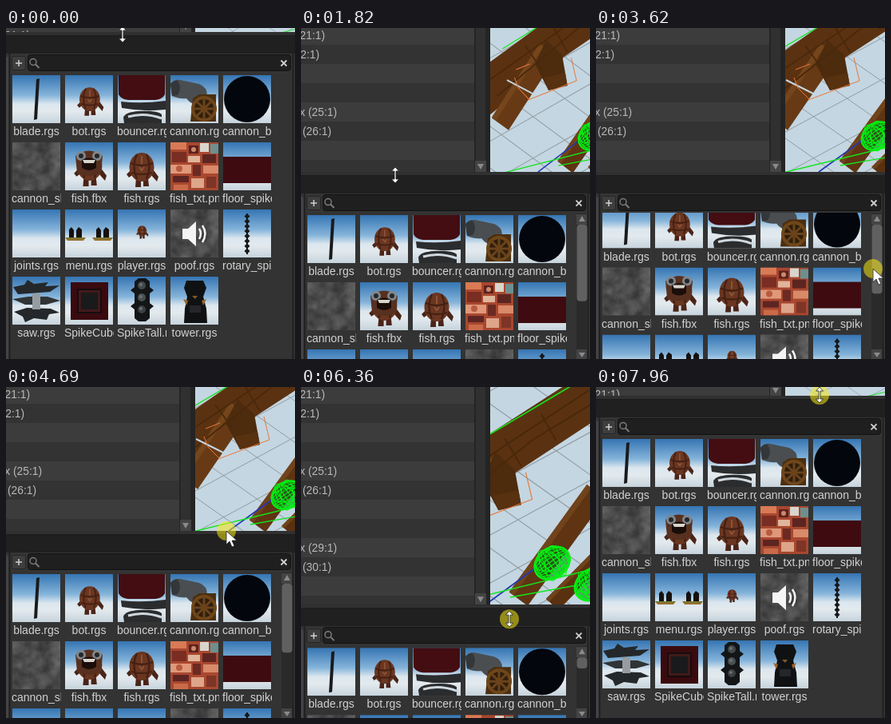
Recreate the animation shown at these times as an HTML page. Size 362x414 px, loop 8000 ms.

```html
<!DOCTYPE html>
<html lang="en">
<head>
<meta charset="utf-8">
<title>Resizing an asset panel</title>
<style>
  html, body { margin: 0; width: 100%; height: 100%; overflow: hidden; background: #333; }
  #stage { display: block; width: 362px; height: 414px; }
  text { font-family: "Liberation Sans", Arial, sans-serif; fill: #d2d2d2; }
  .label { font-size: 14px; }
  .row { font-size: 13.8px; fill: #b9b9b9; text-anchor: end; }
</style>
</head>
<body>
<svg id="stage" viewBox="0 0 362 414" xmlns="http://www.w3.org/2000/svg">
  <defs>
    <linearGradient id="sky" x2="0" y2="1">
      <stop offset="0" stop-color="#3575b3"/>
      <stop offset=".42" stop-color="#85b4da"/>
      <stop offset=".6" stop-color="#dbe6ee"/>
      <stop offset=".75" stop-color="#e3eaee"/>
      <stop offset="1" stop-color="#c6d3dc"/>
    </linearGradient>
    <filter id="smoke" x="0" y="0" width="1" height="1" color-interpolation-filters="sRGB">
      <feTurbulence type="fractalNoise" baseFrequency=".06" numOctaves="3" seed="4"/>
      <feColorMatrix values=".3 0 0 0 .15 .3 0 0 0 .15 .3 0 0 0 .15 0 0 0 0 1"/>
    </filter>
    <g id="critter">
      <path d="M18 31l-7 7 3 4 7-5M42 29l9 12-2 6-8-9M23 42l-1 12h7v-9M32 44v9h7l-1-10" fill="#4a2418"/>
      <ellipse cx="30" cy="29" rx="15.500" ry="18" fill="#6a3621"/>
      <path d="M24 13q-7 14 0 31M36 13q7 14 0 31M16 24q14 6 28 0M17 36q13 4 26 0" fill="none" stroke="#442013" stroke-width="2.200"/>
      <path d="M30 15v10M27 29l3 4 3-4" fill="none" stroke="#8f5838" stroke-width="1.800"/>
    </g>
    <g id="boat">
      <path d="M-13 3h26l-3 4h-20z" fill="#9a6d2e"/>
      <path d="M-12 4h24" stroke="#6c7d35" stroke-width="1.5"/>
      <path d="M-8 3v-10l3-3 3 4v9zM1 3v-9l3-4 4 3v10z" fill="#15110f"/>
    </g>
    <clipPath id="view"><rect x="237" y="0" width="125" height="414"/></clipPath>
  </defs>

  <g id="list"></g>
  <rect x="217" width="20" height="414" fill="#242424"/>
  <rect x="219" width="12" height="414" fill="#303030"/>
  <g id="listEnd">
    <rect x="218" y="-7" width="14" height="14" fill="#444"/>
    <path d="M221-3h8l-4 7z" fill="#8a8a8a"/>
  </g>
  <g clip-path="url(#view)"><g id="scene"></g></g>

  <g id="panel">
    <rect y="-39" width="362" height="500" fill="#1c1c1c"/>
    <rect y="-39" width="362" height="4" fill="#303030"/>
    <rect y="-34" width="362" height="22" fill="#202020"/>
    <rect y="-12" width="362" height="500" fill="#353535"/>
    <rect x="5" y="12" width="354" height="480" fill="#333"/>
    <rect x="-4" y="-8" width="7" height="500" rx="3" fill="#444"/>
    <path d="M4.500-12V480M359.500-12V480" stroke="#202020" stroke-width="2"/>
    <rect x="7.500" y="-8.500" width="17" height="17" rx="2" fill="#3e3e3e" stroke="#242424"/>
    <path d="M12 0h8M16-4v8" stroke="#d0d0d0" stroke-width="1.500"/>
    <rect x="27.500" y="-10.500" width="329" height="20" rx="3" fill="#1f1f1f" stroke="#121212"/>
    <circle cx="34" cy="-1.500" r="4" fill="none" stroke="#7c7c7c" stroke-width="1.500"/>
    <path d="M37 1.500l4.500 4.500" stroke="#7c7c7c" stroke-width="2"/>
    <path d="M344.500-3.500l7 7m0-7l-7 7" stroke="#d0d0d0" stroke-width="1.800"/>
  </g>
  <svg id="content" x="5" width="340" height="500"><g id="cells"></g></svg>
  <g id="bar">
    <rect id="track" x="345" width="13" height="400" fill="#2a2a2a"/>
    <rect id="up" x="345" width="13" height="13" fill="#444"/>
    <path id="upMark" d="M348 3h8l-4-7z" fill="#8a8a8a"/>
    <rect x="345" y="402" width="13" height="12" fill="#444"/>
    <path d="M348 406h8l-4 6z" fill="#8a8a8a"/>
    <rect id="thumb" x="345.500" width="13" rx="4" fill="#606060"/>
  </g>

  <g id="cursor">
    <circle id="press" r="12" fill="#f8e812" opacity=".54"/>
    <path id="resize" d="M0-10l4.500 5H1V5h3.500L0 10l-4.500-5H-1V-5h-3.500z" fill="#fff" stroke="#222" stroke-width=".8"/>
    <path id="arrow" d="M0 0v17l4-4 3 7 3-1.300-3-6.700h6z" fill="#fff" stroke="#222" stroke-width=".8"/>
  </g>
</svg>

<script>
const $ = id => document.getElementById(id);
const set = (id, attrs) => { for (const k in attrs) $(id).setAttribute(k, attrs[k]); };
const show = (id, on) => set(id, { visibility: on ? 'visible' : 'hidden' });
const rect = (x, y, w, h, fill) => `<rect x="${x}" y="${y}" width="${w}" height="${h}" fill="${fill}"/>`;
const path = (d, fill, more = '') => `<path d="${d}" fill="${fill}" ${more}/>`;
const line = (d, stroke, w = 1) => path(d, 'none', `stroke="${stroke}" stroke-width="${w}"`);
const dot = (x, y, r, fill) => `<circle cx="${x}" cy="${y}" r="${r}" fill="${fill}"/>`;
const times = (n, f) => Array.from({ length: n }, (_, i) => f(i)).join('');
const critter = (scale, x, y) => `<use href="#critter" transform="translate(${x} ${y}) scale(${scale})"/>`;

// Asset thumbnails
const sky = rect(0, 0, 60, 60, 'url(#sky)');
const smoke = '<rect width="60" height="60" fill="#555" filter="url(#smoke)"/>';
const assets = [
  ['blade.rgs', sky + path('M30 5l4-1-3 51-4 1z', '#191a1c')],
  ['bot.rgs', sky + critter(.83, 6, 6)],
  ['bouncer.rgs', sky + path('M1 0h58v24q-3 6-12 7H13Q4 30 1 24z', '#430d11')
    + path('M4 33q26 3 56-1v11q-28 3-55-2z', '#2a2c2e')
    + path('M7 53q2-7 20-8 22-1 28 4v11H8z', '#2a2c2e') + line('M13 52q20-6 42 2', '#cfd8de', 3)],
  ['cannon.rgs', sky + path('M0 11q4-6 12-5l24 5q10 4 10 14 0 11-11 12-9 0-15-8-8 1-18-3z', '#4a4e51')
    + path('M0 11q5-5 9-4 6 9 0 18l-7 1z', '#33373a') + path('M28 29l8-5h21v34H25z', '#4b2f10')
    + '<circle cx="42" cy="42" r="14" fill="#2e1f0e" stroke="#70471a" stroke-width="4"/>'
    + line('M42 28v28M28 42h28M32 32l20 20M52 32l-20 20', '#6b431a', 3)],
  ['cannon_ball.rgs', sky + dot(30, 30, 29, '#03060c')],
  ['cannon_slot.png', smoke],
  ['fish.fbx', sky + critter(1.02, 0, 0)
    + path('M13 17q17-13 34 0l-2 21q-15 8-30 0z', '#57301f')
    + dot(20, 17, 6, '#80868a') + dot(40, 17, 6, '#80868a') + dot(20, 17, 3, '#24282b') + dot(40, 17, 3, '#24282b')
    + path('M21 22q9-5 18 0v10q-9 6-18 0z', '#1a0d0a') + path('M22 22h16l-2 4h-12z', '#d8d4cb')],
  ['fish.rgs', sky + critter(1, 0, 2)],
  ['fish_txt.png', rect(0, 0, 60, 60, '#a9472f') + rect(0, 0, 20, 9, '#d97a55') + rect(23, 4, 12, 10, '#5c211e')
    + rect(37, 1, 11, 11, '#d8d5cc') + rect(50, 2, 10, 12, '#6d8f8e') + rect(2, 12, 18, 13, '#7a2d22')
    + rect(22, 17, 15, 8, '#dfb59b') + rect(40, 15, 17, 11, '#5d2520') + rect(0, 28, 26, 11, '#e0987a')
    + rect(28, 28, 10, 14, '#6b2a22') + rect(41, 29, 19, 10, '#d98a68') + rect(3, 42, 20, 8, '#5d2522')
    + rect(26, 45, 16, 12, '#dda58a') + rect(45, 43, 12, 14, '#7d3527') + rect(4, 53, 18, 7, '#c96b49')
    + dot(29, 9, 3, '#c98a6d') + dot(11, 33, 4, '#b85a3f')],
  ['floor_spike.rgs', sky + rect(0, 18, 60, 33, '#3d0b10')],
  ['joints.rgs', sky],
  ['menu.rgs', sky + '<use href="#boat" x="13" y="32"/><use href="#boat" x="47" y="32"/>'],
  ['player.rgs', sky + critter(.38, 19, 16)],
  ['poof.rgs', smoke + path('M15 24h7l10-9v31l-10-9h-7z', '#f4f4f4')
    + line('M36 24q4 6 0 13M40 20q7 10 0 21', '#f4f4f4', 2.5)],
  ['rotary_spike.rgs', sky + rect(29, 5, 2, 51, '#17181a')
    + times(8, i => path(`M30 ${5 + i * 6.2}l3.500 3.500-3.500 3.500-3.500-3.500z`, '#17181a'))],
  ['saw.rgs', sky + path('M1 13l14-3 4-6 8 5 18-2-4 5 18-1-12 8-40 3z', '#24282a')
    + path('M0 28l20-3h24l16 5-18 5H16z', '#303436')
    + path('M2 44l16-5 30 1 11 5-13 2-3 7-16-2-11 5-3-7z', '#24282a') + rect(25, 21, 10, 20, '#969ca0')],
  ['SpikeCube.rgs', sky + rect(7, 7, 47, 47, '#390b0f') + rect(15, 15, 31, 31, '#150d0e')
    + rect(17, 17, 27, 27, '#43191b') + rect(20, 20, 21, 21, '#191a1b')],
  ['SpikeTall.rgs', sky + path('M21 6l5-4h9l5 4v46l-5 4h-9l-5-4zM21 13l-5 4 5 4M40 13l5 4-5 4M21 33l-5 4 5 4M40 33l5 4-5 4', '#131517')
    + dot(30, 11, 5, '#42474a') + dot(30, 26, 5, '#4a4f52') + dot(30, 41, 5, '#3b4043')
    + dot(29, 10, 2, '#6b7072') + dot(29, 25, 2, '#6b7072') + dot(29, 40, 2, '#6b7072')],
  ['tower.rgs', sky + path('M20 5h21l4 9-4 11 4 15 1 18H17l1-18 3-15-4-11z', '#101113')
    + path('M16 28l6 2-2 6zM45 28l-6 2 2 6z', '#9a6426') + rect(24, 36, 14, 9, '#24262a')
    + path('M27 24h7l-3 4z', '#7c5a24')],
];
$('cells').innerHTML = assets.map(([name, art], i) => {
  const x = 3 + i % 5 * 66, y = 3 + Math.floor(i / 5) * 84;
  return `<svg x="${x}" y="${y}" width="60" height="60">${art}</svg>
    <svg x="${x - 1}" y="${y + 60}" width="62" height="24"><text class="label" y="15">${name}</text></svg>`;
}).join('');
// Short names are centred, long ones start at the left and are cut off
for (const label of document.querySelectorAll('.label')) {
  label.setAttribute('x', Math.max(0, 31 - label.getComputedTextLength() / 2));
}

// Hierarchy rows
$('list').innerHTML = times(16, i => {
  const y = i * 24 - 3, k = i % 4;
  const end = i < 2 ? 30 - 7 * i : 45 - 7 * k;
  return rect(0, y, 218, 24, i % 2 ? '#333' : '#3c3c3c')
    + (k < 2 ? `<text class="row" x="${end}" y="${y + 17}">${k ? '' : 'x '}(${21 + i}:1)</text>` : '');
});

// 3D view, laid out for a bottom edge at y = 0
const beam = (x1, y1, x2, y2, w, fill, edge) =>
  line(`M${x1} ${y1}L${x2} ${y2}`, fill, w)
  + `<g transform="translate(${-w * .3} ${-w * .25})">${line(`M${x1} ${y1}L${x2} ${y2}`, edge, w * .25)}</g>`;
const ball = (x, y) => `<g transform="translate(${x} ${y}) rotate(-35)" fill="none" stroke="#00f510">
  <ellipse rx="21" ry="16.500" fill="#0b6a1c" fill-opacity=".6" stroke-width="1.500"/>`
  + times(4, i => `<ellipse rx="${3 + i * 5}" ry="16.500"/><ellipse rx="21" ry="${2 + i * 4}"/>`)
  + times(3, i => `<ellipse rx="19" ry="8" transform="rotate(${25 + i * 50})"/>`) + '</g>';
$('scene').innerHTML = rect(-100, -400, 700, 410, '#c4d6e1')
  + times(14, i => line(`M0 ${-520 + i * 52}l500 350`, '#929ca3'))
  + times(14, i => line(`M0 ${-130 + i * 52}l500 -270`, '#929ca3'))
  + beam(352, 0, 412, -60, 18, '#5a3110', '#6f4219')
  + beam(315, -6, 400, -122, 25, '#5f3413', '#70431b')
  // deck, its planks and the posts below
  + path('M180-113L225-144 287-187 359-233 420-270V-212L395-197 312-143 290-128 260-105 200-60z', '#5b3211')
  + beam(229, -60, 292, -152, 27, '#673a15', '#75451b')
  + path('M275-135L293-102 318-108 311-146 290-165z', '#4d2b0d')
  + path('M293-102l25-6-3-16-28 6z', '#573110')
  + line('M200-105L300-172 420-250M225-95L330-178 420-232M262-158l22 30M300-180l18 30M340-206l16 28', '#49280c', 1.8)
  + line('M238-115l36 18', '#c4d6e1', 2)
  + line('M266-90L330-114L323-143M250-128l18-7M248-118l5 13 14 14', '#e8783a')
  + line('M279 0l58-42', '#2038b4', 1.6)
  + line('M180 14L420-44M232-154L363-231 430-270M306-8L430-30', '#12e51c', 1.3)
  + ball(352, -45) + ball(396, -22);

// Smooth curve through [time, value] points that never overshoots
function track(...p) {
  const slope = i => (p[i + 1][1] - p[i][1]) / (p[i + 1][0] - p[i][0]);
  const tan = p.map((_, i) => {
    if (!i || i === p.length - 1) return 0;
    const a = slope(i - 1), b = slope(i);
    return a * b > 0 ? 2 * a * b / (a + b) : 0;
  });
  return t => {
    if (t <= p[0][0]) return p[0][1];
    const j = p.findIndex(q => q[0] > t);
    if (j < 0) return p[p.length - 1][1];
    const i = j - 1, h = p[j][0] - p[i][0], u = (t - p[i][0]) / h, v = 1 - u;
    return p[i][1] * (1 + 2 * u) * v * v + p[j][1] * u * u * (3 - 2 * u)
      + h * u * v * (tan[i] * v - tan[j] * u);
  };
}
const pointerX = track([0, 146], [610, 146], [1820, 118], [1900, 118], [2220, 300], [2550, 347],
  [4250, 347], [4690, 276], [5360, 276], [6360, 261], [7160, 281], [7960, 280]);
const pointerY = track([0, 8], [610, 8], [1250, 80], [1680, 151], [1750, 183], [1820, 184], [1900, 184],
  [2220, 266], [2550, 293], [2760, 293], [3080, 338], [3500, 293], [3550, 293], [3620, 301], [3900, 335],
  [4250, 293], [4690, 180], [5290, 180], [6220, 265], [6290, 272], [6360, 290], [6560, 310],
  [7020, 242], [7090, 211], [7160, 176], [7500, 60], [7890, 11], [7960, 10]);

// The window follows the pointer with a short delay
const LAG = 70;
const split = t => t < 1890 ? pointerY(t - LAG) + 36 : t < 5360 ? 219 : pointerY(t - LAG) + 39;
const scroll = t => t > 2760 && t < 4250 ? (pointerY(t) - 293) / .44 : 0;
const within = (t, a, b) => t >= a && t < b;

function draw(t) {
  const s = split(t), old = split(t - LAG);
  const zoom = v => (v + 374) / 593;
  set('listEnd', { transform: `translate(0 ${s - 46})` });
  set('scene', { transform: `translate(612 ${s - 39}) scale(${zoom(old)} ${zoom(s)}) translate(-612 0)` });
  set('panel', { transform: `translate(0 ${s})` });
  set('content', { y: s + 12 });
  set('cells', { transform: `translate(0 ${-scroll(t)})` });

  show('bar', s > 62);
  set('track', { y: s + 13 });
  set('up', { y: s + 14 });
  set('upMark', { transform: `translate(0 ${s + 20})` });
  const room = Math.max(0, 376 - s), seen = Math.min(1, (364 - (s + old) / 2) / 264);
  set('thumb', { y: s + 27 + scroll(t - LAG) * .44, height: Math.max(13, room * seen) });

  const resizing = t < 1880 || t >= 4890;
  set('cursor', { transform: `translate(${pointerX(t)} ${pointerY(t)})` });
  show('resize', resizing);
  show('arrow', !resizing);
  show('press', within(t, 340, 1810) || within(t, 2550, 4250) || t >= 4680);
}

const start = performance.now();
function frame() {
  draw((performance.now() - start) % 8000);
  requestAnimationFrame(frame);
}
draw(0);
requestAnimationFrame(frame);
</script>
</body>
</html>
```
